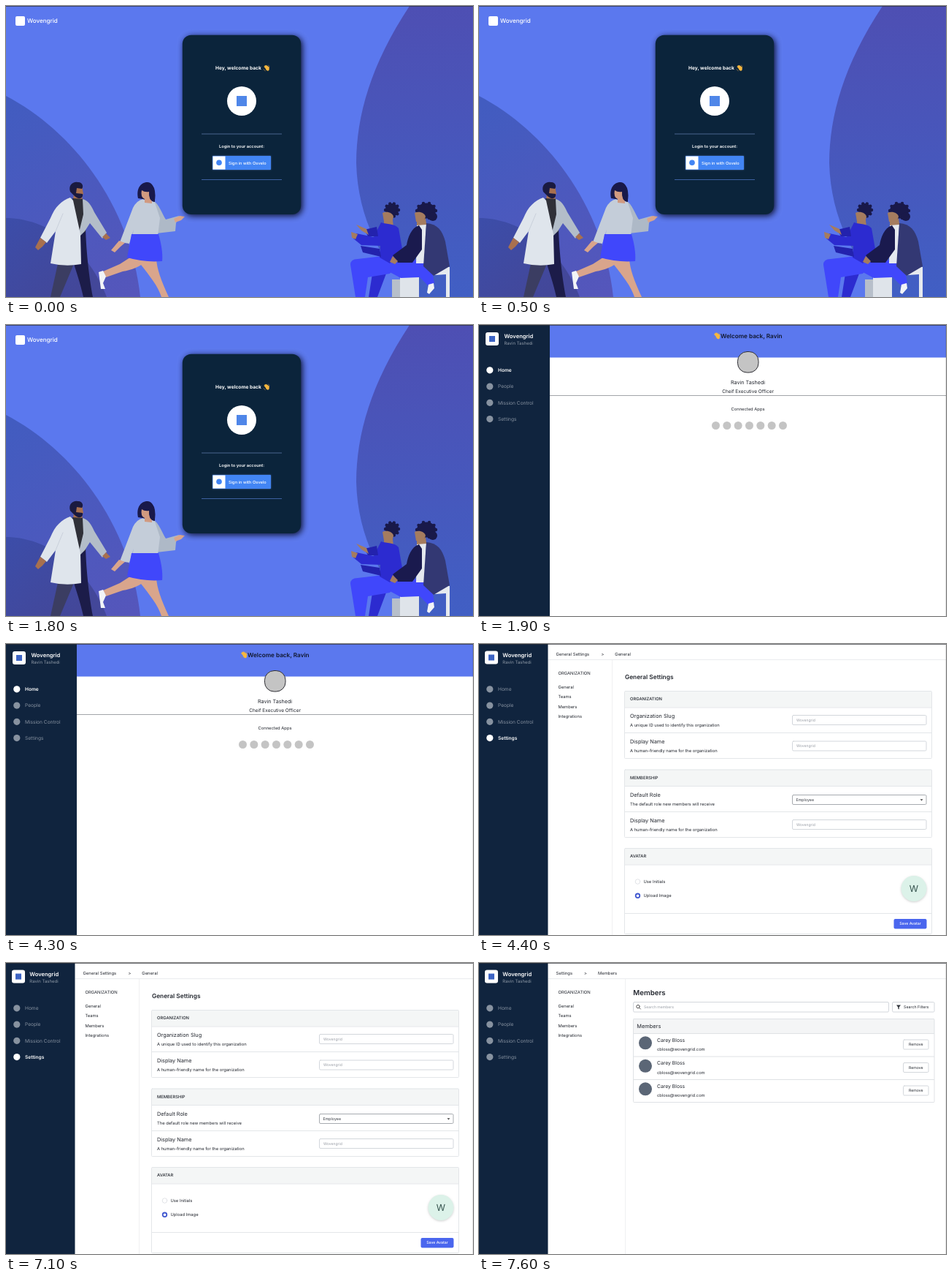
Recreate the animation shown at these times as an HTML page with a canvas. Size 640x398 px, loop 8.6 s.

```html
<!DOCTYPE html>
<html lang="en">
<head>
<meta charset="utf-8">
<title>Workspace tour</title>
<style>
html, body { margin: 0; width: 100%; height: 100%; overflow: hidden; background: #fff; }
canvas { display: block; width: 640px; height: 398px; }
</style>
</head>
<body>
<canvas id="stage"></canvas>
<script>
const W = 640, H = 398, LOOP = 8600;
const COMPANY = 'Wovengrid', USER = 'Ravin Tashedi';
const MEMBER = 'Carey Bloss', EMAIL = 'cbloss@wovengrid.com';
const NAVY = '#10243e', BLUE = '#5b78ee', INK = '#22262e', BORDER = '#e3e6e9';
const HAIR = '#19194a', TROUSERS = '#4047fb';

const canvas = document.getElementById('stage');
const ctx = canvas.getContext('2d');
const ratio = window.devicePixelRatio || 1;
canvas.width = W * ratio;
canvas.height = H * ratio;
ctx.scale(ratio, ratio);
if ('textRendering' in ctx) ctx.textRendering = 'geometricPrecision';

function rect(x, y, w, h, fill) {
  ctx.fillStyle = fill;
  ctx.fillRect(x, y, w, h);
}

function paint(fill, stroke, width) {
  if (fill) { ctx.fillStyle = fill; ctx.fill(); }
  if (stroke) { ctx.strokeStyle = stroke; ctx.lineWidth = width; ctx.stroke(); }
}

function box(x, y, w, h, r, fill, stroke, width = 1) {
  ctx.beginPath();
  ctx.roundRect(x, y, w, h, r);
  paint(fill, stroke, width);
}

function dot(x, y, r, fill, stroke, width = 1) {
  ctx.beginPath();
  ctx.arc(x, y, r, 0, Math.PI * 2);
  paint(fill, stroke, width);
}

function shape(fill, d) {
  ctx.fillStyle = fill;
  ctx.fill(new Path2D(d));
}

function stroke(color, width, d) {
  ctx.strokeStyle = color;
  ctx.lineWidth = width;
  ctx.lineCap = ctx.lineJoin = 'round';
  ctx.stroke(new Path2D(d));
}

function shadowed(color, blur, offsetX, offsetY, draw) {
  ctx.save();
  ctx.shadowColor = color;
  ctx.shadowBlur = blur * ratio;
  ctx.shadowOffsetX = offsetX * ratio;
  ctx.shadowOffsetY = offsetY * ratio;
  draw();
  ctx.restore();
}

// y is the middle of the capital letters
function text(str, x, y, size, color = INK, weight = 400, align = 'left') {
  ctx.font = `${weight} ${size}px Inter, sans-serif`;
  ctx.fillStyle = color;
  ctx.textAlign = align;
  ctx.fillText(str, x, y + size * 0.365);
}

function gradient(x0, y0, x1, y1, from, to) {
  const g = ctx.createLinearGradient(x0, y0, x1, y1);
  g.addColorStop(0, from);
  g.addColorStop(1, to);
  return g;
}

function wavingHand(x, y, size) {
  ctx.save();
  ctx.translate(x, y);
  ctx.scale(size / 10, size / 10);
  stroke('#f6b73f', 1.6, 'M.2 1 L-3 -2.2 M1 .2 L-2 -3.6 M2 -.4 L-.2 -3.8 M2.8 0 L1.8 -2.6 M2.6 2 L3.6 -1.2');
  shape('#f6b73f', 'M-1.6 .4 L1.6 -2 C3.6 -1 4.6 1 3.8 3 C2.8 4.9 .6 4.4 -.6 2.6 Z');
  stroke('#b98b4a', .6, 'M-4.4 1.6 Q-3.8 3.8 -1.8 4.2 M2.4 -4.4 Q4 -4.2 4.4 -2.6');
  ctx.restore();
}

function curls(x, y, rx, ry) {
  ctx.beginPath();
  ctx.ellipse(x, y, rx, ry, 0, 0, Math.PI * 2);
  paint(HAIR);
  for (let a = 0; a < Math.PI * 2; a += Math.PI / 5) {
    dot(x + rx * Math.cos(a), y + ry * Math.sin(a), 2.2, HAIR);
  }
}

function walkingMan() {
  const skin = '#a8704f';
  shape('#3b3d62', 'M72 348 L95 348 L74 398 L61 398 Z');
  shape('#1c1c49', 'M96 300 L109 296 C109 330 114 372 119 398 L106 398 C102 380 96 362 92 350 Z');
  shape(skin, 'M93 254 L104 254 L105 270 L92 268 Z');
  shape('#2f3038', 'M91 263 L106 264 L109 309 L94 312 Z');
  shape('#b3bdc9', 'M105 264 C113 266 117 273 121 282 L138 310 L132 318 L115 297 L108 308 L98 318 L106 285 Z');
  shape('#dfe5ec', 'M88 262 C76 266 67 275 61 290 L47 317 L56 324 L68 308 L61 352 Q82 357 103 353 L102 312 L92 266 Z');
  stroke('#c3cbd6', .8, 'M78 284 L68 308');
  shape(skin, 'M47 317 L55 323 L50 329 L44 334 L40 330 Z M132 316 L137 311 L143 317 L137 320 Z');
  shape(skin, 'M94 248 L104 246 L106 257 L102 263 L94 260 Z');
  shape('#1a1a40', 'M88 254 C85 245 92 240 98 241 C104 240 107 246 104 250 L97 249 L96 256 L105 257 C106 264 99 265 94 260 Z');
}

function walkingWoman() {
  const skin = '#d9a58c';
  shape(skin, 'M170 344 L194 347 C184 357 172 361 160 363 L137 371 L133 363 L156 353 Z');
  shape(skin, 'M180 347 L206 346 C207 360 212 374 223 398 L213 398 C209 384 196 368 185 354 Z');
  shape('#f2f4f7', 'M127 364 L133 362 L137 370 L133 379 L136 387 L130 387 Z');
  shape('#aeb9c7', 'M201 266 C210 270 214 285 219 292 L237 287 L233 297 L232 308 L206 311 L200 292 Z');
  shape('#c4cdd9', 'M188 264 Q196 270 203 266 L211 290 L208 314 L173 314 L175 306 L169 325 L156 323 L174 276 Q179 266 188 264 Z');
  shape(skin, 'M155 321 L163 324 L157 329 L149 337 L144 334 Z M230 291 L238 287 L245 288 L240 293 L232 296 Z');
  shape(TROUSERS, 'M172 312 L209 312 C213 326 215 338 214 349 Q190 351 166 344 Z');
  shape(HAIR, 'M181 263 C178 248 186 241 194 241 C203 242 205 253 204 268 L193 265 Z');
  shape('#d19a80', 'M186 251 Q193 246 199 250 L200 270 L190 269 L190 264 Q184 262 186 251 Z');
  shape(HAIR, 'M183 256 C184 244 198 239 203 249 Q206 260 203 268 Q195 266 196 254 Q190 255 186 252 Z');
}

function seatedPair() {
  const skin = '#a57c5f';
  // seat
  shape('#b7bfca', 'M529 374 L540 374 L540 398 L529 398 Z');
  shape('#dfe4ea', 'M540 370 L566 370 L566 398 L540 398 Z');
  shape('#e6eaef', 'M574 357 L608 357 L608 398 L603 398 L603 367 L574 369 Z');

  // nearer figure
  shape('#2c2bd0', 'M503 360 L524 358 L509 398 L497 398 Z');
  shape(TROUSERS, 'M517 342 L541 348 L526 366 L496 371 L492 398 L479 398 L472 354 Q472 346 482 346 Z');
  shape(skin, 'M518 287 L529 285 L531 302 L518 300 Z');
  shape('#2c2bd0', 'M514 296 C522 299 532 297 538 304 L544 338 L526 352 L512 344 L513 328 L487 327 L476 318 L480 311 L504 316 Z');
  shape('#2322ad', 'M486 328 L512 332 L514 343 L489 337 Z M491 306 L508 302 L510 315 L496 315 Z');
  shape(skin, 'M473 309 L482 312 L479 319 L474 317 Z M480 299 L494 305 L497 313 L487 307 Z');
  curls(529, 279, 9, 9);
  shape(skin, 'M516 283 C522 280 530 283 531 288 L529 296 L518 295 Z');

  // farther figure
  shape(TROUSERS, 'M529 352 L573 346 L584 362 L587 379 L579 383 L567 371 L541 372 L526 364 Z');
  shape('#f2f4f7', 'M579 381 L586 379 L587 386 L580 394 L577 392 Z');
  shape(skin, 'M563 286 L574 284 L577 304 L563 303 Z');
  shape('#e5e9ef', 'M563 300 L576 299 L574 352 L562 352 Z');
  shape('#1a1a4e', 'M566 300 C555 304 551 316 549 327 L530 341 L537 351 L557 351 L570 333 L570 306 Z');
  shape('#333873', 'M576 297 C591 298 598 307 602 322 L608 356 L586 369 L572 356 Z');
  shape(skin, 'M530 342 L537 349 L533 353 L526 350 Z');
  curls(576, 280, 13, 10.5);
  dot(585, 288, 6, HAIR);
  shape(skin, 'M560 283 C566 280 574 283 575 288 L572 296 L562 295 Z');
}

function loginPage() {
  rect(0, 0, W, H, BLUE);
  shape(gradient(0, 140, 170, 398, '#425cc0', '#5556bb'), 'M0 123 C90 170 170 270 184 398 L0 398 Z');
  shape(gradient(0, 290, 90, 398, '#3c4da9', '#434799'), 'M0 290 C55 290 112 330 138 398 L0 398 Z');
  shape(gradient(570, 0, 570, 398, '#4e4fb3', '#415fc4'), 'M553 0 C500 80 480 150 480 215 C482 290 515 355 566 398 L640 398 L640 0 Z');
  walkingMan();
  walkingWoman();
  seatedPair();

  box(13, 14, 13, 13, 2, '#fff');
  text(COMPANY, 29, 20.5, 8.1, '#fff', 500);

  shadowed('rgba(4, 6, 24, .9)', 9, 2, 2, () => box(241.8, 39.8, 162.4, 245.2, 12, '#0b243b'));

  text('Hey, welcome back', 287, 85, 6.65, '#fff', 700);
  wavingHand(357, 85, 9);
  dot(323, 130, 20, '#fff');
  rect(316, 123, 14, 14, '#4f86e8');
  rect(268, 174.5, 110, 1, '#4a648f');
  text('Login to your account:', 323, 192, 5.75, '#fff', 600, 'center');
  shadowed('rgba(90, 130, 200, .9)', 2, 0, 0, () => box(283, 205, 80, 19, 1, '#4285f4'));
  rect(283.5, 205.5, 17, 18, '#fff');
  dot(292, 214.3, 3.8, '#4285f4');
  text('Sign in with Osvelo', 305, 214.5, 5.7, '#fff', 500);
  rect(268, 237, 110, 1, '#3d60a0');
}

function sidebar(width, left, top, active) {
  rect(0, 0, width, H, NAVY);
  box(left, top, 18, 18, 3, '#fff');
  rect(left + 5, top + 5, 8, 8, '#3d64c4');
  const x = left === 9 ? 34.5 : 32.3;
  text(COMPANY, x, 15, 7.6, '#fff', 600);
  text(USER, x, 24.7, 6, '#8f9aa7');
  ['Home', 'People', 'Mission Control', 'Settings'].forEach((label, i) => {
    const on = label === active, y = 61.8 + i * 22.25;
    dot(14.8, y, 4.6, on ? '#fff' : '#8792a0');
    text(label, 26, y, 6.6, on ? '#fff' : '#8792a0', on ? 600 : 400);
  });
}

function homePage() {
  rect(0, 0, W, H, '#fff');
  rect(97, 0, 543, 44.5, BLUE);
  sidebar(97, 9, 10, 'Home');
  wavingHand(326, 15, 10);
  text('Welcome back, ' + USER.split(' ')[0], 331, 15, 8.2, '#11182f', 600);
  box(354.5, 36.5, 28.5, 28.5, 12.8, '#c4c4c4', '#303036');
  text(USER, 368.5, 78, 7.2, INK, 400, 'center');
  text('Cheif Executive Officer', 368.5, 90.6, 6.5, INK, 400, 'center');
  rect(97, 96, 543, 1, '#a2a4a8');
  text('Connected Apps', 368.5, 114.6, 5.85, INK, 400, 'center');
  for (let i = 0; i < 7; i++) dot(324.5 + i * 15.33, 137.5, 5.5, '#c4c4c4');
}

function settingsFrame(active, parent, arrowX, pageX, page, divider) {
  rect(0, 0, W, H, '#fff');
  sidebar(94.5, 8, 9.5, active);
  text(parent, 105.5, 13.6, 5.85);
  text('>', arrowX, 13.6, 5.85, INK, 400, 'center');
  text(page, pageX, 13.6, 5.85);
  rect(95, 21, 545, 1, '#eaecee');
  rect(divider, 22, 1, 376, '#eff0f2');
  text('ORGANIZATION', 108.5, 40, 5.9);
  ['General', 'Teams', 'Members', 'Integrations'].forEach((label, i) =>
    text(label, 108.5, 59 + i * 13.2, 5.8));
}

function card(top, height, title) {
  rect(200, top, 420, 22.5, '#f4f6f6');
  box(199.5, top + .5, 421, height, 1, null, BORDER);
  rect(200, top + 22.5, 420, 1, BORDER);
  text(title, 207, top + 11.3, 5.8, INK, 500);
}

function field(y, title, hint) {
  text(title, 207, y, 7.3);
  text(hint, 207, y + 12.6, 5.8);
}

function input(y, value) {
  box(429.5, y + .5, 183.5, 13, 1.5, '#fff', '#d3d7dc');
  text(value, 435, y + 7, 5.1, '#989da5');
}

function generalPage() {
  settingsFrame('Settings', 'General Settings', 169.5, 186.3, 'General', 182);
  text('General Settings', 200, 44.5, 8.3, INK, 600);
  const nameHint = 'A human-friendly name for the organization';

  card(64, 92, 'ORGANIZATION');
  field(98.4, 'Organization Slug', 'A unique ID used to identify this organization');
  input(97, COMPANY);
  rect(200, 121, 420, 1, BORDER);
  field(133.6, 'Display Name', nameHint);
  input(132.5, COMPANY);

  card(171.5, 92.5, 'MEMBERSHIP');
  field(206, 'Default Role', 'The default role new members will receive');
  box(429.5, 206.5, 183.5, 13, 1.5, '#fff', '#a7abb0');
  text('Employee', 434.5, 213, 5.3, '#363a42');
  shape('#444', 'M604.5 212.2 L608.5 212.2 L606.5 214.6 Z');
  rect(200, 229, 420, 1, BORDER);
  field(241.4, 'Display Name', nameHint);
  input(240, COMPANY);

  card(279, 117, 'AVATAR');
  dot(217.5, 325, 3.3, '#fff', '#d8dbe0', .8);
  text('Use Initials', 225.5, 325, 5.8);
  dot(217.5, 344.3, 2.8, '#fff', '#4158d0', 1.8);
  text('Upload Image', 225.5, 344.3, 5.8);
  shadowed('rgba(0, 0, 0, .18)', 3, 0, 1, () => dot(596, 334.5, 17.5, '#dcf2e9'));
  text(COMPANY[0], 596, 334.7, 12.5, '#35534e', 400, 'center');
  rect(200, 368, 420, 1, BORDER);
  box(568.5, 376, 45, 13.5, 2, '#4a66ee');
  text('Save Avatar', 591, 382.6, 5.2, '#fff', 500, 'center');
}

function membersPage() {
  settingsFrame('', 'Settings', 146, 163, 'Members', 200);
  text('Members', 211.3, 40, 9.7, INK, 600);
  box(211.5, 53.5, 350, 13.5, 1.5, '#fff', '#d3d7dc');
  dot(218, 59.6, 2.2, null, '#444', .9);
  stroke('#444', .9, 'M219.7 61.3 L221.4 63');
  text('Search members', 226, 60.3, 5.1, '#989da5');
  box(566.5, 53.5, 57.5, 13.5, 1.5, '#fff', '#d3d7dc');
  shape('#2f333a', 'M572 57.6 L578 57.6 L575.7 60.4 L575.7 63.4 L574.3 62.6 L574.3 60.4 Z');
  text('Search Filters', 582, 60.3, 5.3);

  rect(211, 76, 413, 20, '#f4f5f6');
  text('Members', 216.3, 86.5, 7.4);
  for (let i = 0; i < 3; i++) {
    const y = 96 + i * 31.5;
    rect(211, y, 413, 1, '#dfe2e5');
    dot(228, y + 13.3, 9, '#5b6676');
    text(MEMBER, 244, y + 9.3, 6.8);
    text(EMAIL, 244, y + 22.2, 5.8);
    box(581.5, y + 9, 34.5, 13, 1.5, '#fff', '#d3d7dc');
    text('Remove', 598.8, y + 15.6, 5.2, INK, 400, 'center');
  }
  box(211.5, 76.5, 412.5, 114, 1, null, '#dfe2e5');
}

const scenes = [
  [0, loginPage],
  [1900, homePage],
  [4400, generalPage],
  [7300, membersPage]
];

let shown = null;
function tick(now) {
  const t = now % LOOP;
  const draw = scenes.filter(([start]) => t >= start).pop()[1];
  if (draw !== shown) {
    shown = draw;
    draw();
    if (draw !== loginPage) rect(639, 1, 1, H, 'rgba(0, 0, 0, .1)');
    rect(0, 0, W, 1, 'rgba(40, 42, 50, .65)');
  }
  requestAnimationFrame(tick);
}
tick(performance.now());
</script>
</body>
</html>
```
